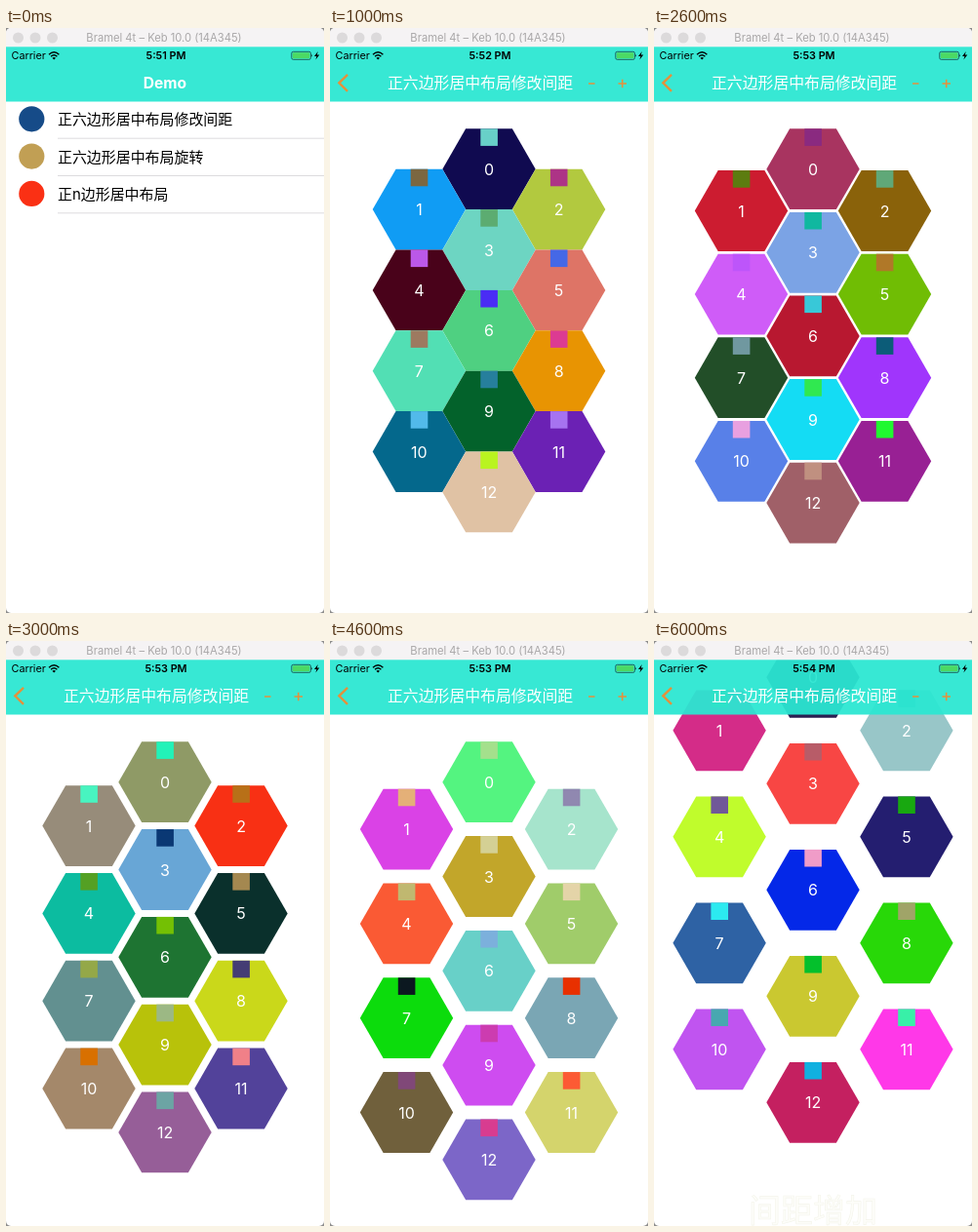
An HTML page that plays this animation: 326x600 px, repeating every 7000 ms.

```html
<!DOCTYPE html>
<html lang="zh">
<head>
<meta charset="utf-8">
<title>Demo</title>
<style>
html, body { margin: 0; width: 100%; height: 100%; overflow: hidden; background: #8b8b8b; }
svg { display: block; width: 326px; height: 600px; }
text { font-family: Inter, "Noto Sans CJK SC", "Noto Sans CJK", sans-serif; }
.mid { text-anchor: middle; }
.label { font-size: 16px; fill: #fff; text-anchor: middle; }
.row { font-size: 14.95px; }
.nav { font-size: 15.85px; font-weight: 500; fill: #fff; }
.status { font-size: 10.8px; }
.tool { fill: none; stroke: #e4913c; }
</style>
</head>
<body>
<svg viewBox="0 0 326 600">
  <clipPath id="window"><rect width="326" height="600" rx="5"/></clipPath>
  <g clip-path="url(#window)">
    <rect width="326" height="600" fill="#fff"/>
    <g id="list"></g>
    <g id="cells"></g>
    <text id="toast" class="mid" x="163" y="596" font-size="33" font-weight="500" fill="#fdfdf9" stroke="#f3f4ea" stroke-width=".6">间距增加</text>
    <rect y="19" width="326" height="56.5" fill="#2be7d2" fill-opacity=".94"/>
    <rect width="326" height="19.3" fill="#f5f3f4"/>
    <g fill="#dcdadb">
      <circle cx="12.5" cy="10" r="5.5"/><circle cx="30" cy="10" r="5.5"/><circle cx="47.5" cy="10" r="5.5"/>
    </g>
    <text class="mid" x="162" y="14" font-size="11.2" fill="#a9a7a8">Bramel 4t – Keb 10.0 (14A345)</text>

    <text class="status" x="5.5" y="32">Carrier</text>
    <g fill="none" stroke="#000" stroke-width="1.4">
      <path d="M44 27.2Q49.2 22.4 54.4 27.2M46 29.3Q49.2 26.4 52.4 29.3"/>
    </g>
    <path d="M47.4 30.7Q49.2 29.2 51 30.7L49.2 32.6Z"/>
    <text class="status mid" id="clock" x="164" y="32" font-weight="600"></text>
    <rect x="292.8" y="24.3" width="19.6" height="8" rx="1.6" fill="none" stroke="#163f3a" stroke-width=".8"/>
    <rect x="293.8" y="25.3" width="17.6" height="6" rx=".6" fill="#4cd964"/>
    <path d="M313.2 26.8q1.4 1.5 0 3z"/>
    <path d="M319.8 24L316 28.9H318.4L317.4 32.6L321.3 27.5H318.8Z"/>

    <text id="home" class="mid" x="163" y="61.5" font-size="15.6" font-weight="700" fill="#fff">Demo</text>
    <g id="bar">
      <path class="tool" stroke-width="2.4" d="M18 47.8L9.3 56.3L18 64.8"/>
      <text class="nav" x="59" y="61.6">正六边形居中布局修改间距</text>
      <path class="tool" stroke-width="1.6" d="M265 57H271.5M295.5 57H304M299.7 52.8V61.2"/>
    </g>
  </g>
</svg>
<script>
const $ = id => document.getElementById(id);

const rows = [
  ["#164b88", "正六边形居中布局修改间距"],
  ["#c19f54", "正六边形居中布局旋转"],
  ["#fa3014", "正n边形居中布局"]
];

// Each palette: hexagon and badge colour for cells 0 to 12.
const palettes = [
  "100a50 68d0c8 109cf4 7b6741 b2c93f ad3486 6dd5c2 5cac71 49021a bb58e8 de7466 4568e6 4fd081 4a2cf5 52dfb4 9d7a60 e89402 dc3b92 03622b 267f9c 04688c 52baea 6b21b4 a673f0 e0c2a4 b9f420",
  "a83460 8a2a80 cc1c30 5c7c10 8a620a 60a878 7ba3e5 10b8a0 cf5cf8 bd55fa 70bd04 b07828 b81830 38c8d8 224e28 7098a0 a035fc 0c5c78 14dcf4 30e850 5880e8 e8a0e0 982094 20f830 a06068 c09080",
  "8f9a66 22f2b8 978c7a 48f4c0 f83014 b87018 68a6d6 0a3874 0cbca0 54a024 0a302c a48850 1e7432 74c004 629090 94a848 cad81a 443c74 b8c20a 9cb884 a4886a d87000 52429a f08088 965e98 6ca4a4",
  "54f480 a4e08c da42e6 e4b078 a6e4cc 9088b0 c2a62a d4d094 fa5a34 c0b870 a0cc6a e4d4a8 68d0c8 7cb0dc 0cdc0c 0c1820 7aa6b4 e83000 ce4cf0 cc3cb0 70603c 804878 d4d46c fc5a34 7c66c8 d83c90",
  "2a1e50 9878b4 d42c88 68983c 98c6c8 48a8b0 f84644 b85c68 c0fc2c 705898 241e70 18a810 0428e8 f09cc8 2e62a4 2ceaf0 28d808 a0a468 cac830 04c02c c054f0 48a8b0 ff38e8 38f0a8 c42060 10b0e0"
].map(p => p.split(" "));

// dx, dy: column and row pitch of the honeycomb.
const steps = [
  { time: "5:51" },
  { time: "5:52", palette: 0, dx: 71.6, dy: 82.8 },
  { time: "5:53", palette: 1, dx: 73.5, dy: 85.6 },
  { time: "5:53", palette: 2, dx: 78, dy: 89.8 },
  { time: "5:53", palette: 3, dx: 84.5, dy: 96.8 },
  { time: "5:54", palette: 4, dx: 95.9, dy: 109 },
  { time: "5:54", palette: 4, dx: 95.9, dy: 109, scroll: 107.4, toast: true }
];
const STEP = 1000;

$("list").innerHTML = rows.map(([color, name], i) => {
  const y = 93.3 + i * 38.3;
  return `<circle cx="26.3" cy="${y}" r="13.1" fill="${color}"/>
    <text class="row" x="53" y="${y + 6}">${name}</text>
    <path d="M53 ${y + 19.9}H326" stroke="#d3d2d6" stroke-width=".8"/>`;
}).join("");

function cell(i, { palette, dx, dy, scroll = 0 }) {
  const side = [0, -1, 1][i % 3];
  const x = 163 + side * dx;
  const y = 144.7 + (Math.floor(i / 3) + Math.abs(side) / 2) * dy - scroll;
  const [fill, badge] = palettes[palette].slice(i * 2);
  return `<g transform="translate(${x} ${y})">
    <path d="M-47.7 0L-23.85 -41.4H23.85L47.7 0L23.85 41.4H-23.85Z" fill="#${fill}"/>
    <rect x="-8.7" y="-41.4" width="17.6" height="17.6" fill="#${badge}"/>
    <text class="label" y="6">${i}</text></g>`;
}

const show = (id, on) => { $(id).style.display = on ? "" : "none"; };

function render(step) {
  const grid = step.palette !== undefined;
  show("list", !grid);
  show("home", !grid);
  show("bar", grid);
  show("toast", step.toast);
  $("clock").textContent = step.time + " PM";
  $("cells").innerHTML = grid ? Array.from({ length: 13 }, (_, i) => cell(i, step)).join("") : "";
}

let shown = -1;
function tick() {
  const n = Math.floor(performance.now() / STEP) % steps.length;
  if (n !== shown) render(steps[shown = n]);
  requestAnimationFrame(tick);
}
tick();
</script>
</body>
</html>
```
